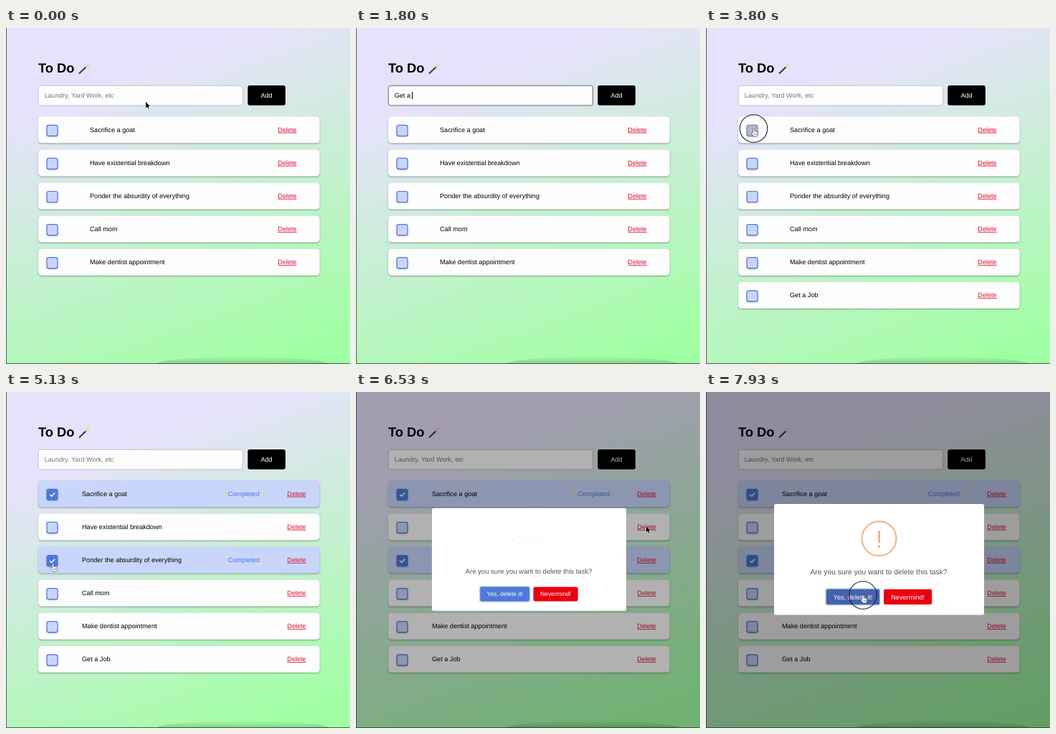
An HTML page with a canvas that plays this animation: 480 by 468 pixels, repeating every 8000 ms.

```html
<!DOCTYPE html>
<html lang="en">
<head>
<meta charset="utf-8">
<title>To Do</title>
<style>
  html, body { margin: 0; width: 100%; height: 100%; overflow: hidden; }
  canvas { display: block; }
</style>
</head>
<body>
<canvas id="stage" width="480" height="468"></canvas>
<script>
const ctx = document.getElementById('stage').getContext('2d');
const LOOP = 8000, STEP = 1000 / 15;
const FONT = '"Liberation Sans", Arial, sans-serif';
const BLUE = '#4f78d8', PALE_BLUE = '#c8d6fb', RED = '#dc1035';
const TASKS = ['Sacrifice a goat', 'Have existential breakdown',
  'Ponder the absurdity of everything', 'Call mom', 'Make dentist appointment', 'Get a Job'];
const NEW_TASK = TASKS[5];

const TIME = { focus: 600, type: 866, key: 166, add: 3120, check1: 3860, check3: 5120, modal: 6479 };
const CLICKS = [[530, 660], [3000, 3110], [3730, 3860], [5000, 5110], [6400, 6500], [7860, 8000]];
// Pointer stops: time, x, y
const PATH = [[0, 195, 103], [60, 195, 103], [470, 150, 95], [2390, 150, 95], [2900, 362, 95],
  [3260, 362, 95], [3720, 66.5, 140], [4130, 66.5, 140], [4670, 65.5, 239], [5470, 65.5, 239],
  [6270, 405, 187], [6660, 405, 187], [7540, 219, 283], [8000, 219, 283]];

const clamp = v => Math.max(0, Math.min(1, v));
const smooth = v => v * v * (3 - 2 * v);
const easeOut = v => 1 - (1 - v) ** 2;

function keyed(stops, t, ease) {
  const i = Math.max(1, stops.findIndex(s => s[0] >= t));
  const a = stops[i - 1], b = stops[i];
  const k = ease(clamp((t - a[0]) / (b[0] - a[0])));
  return a.slice(1).map((v, n) => v + (b[n + 1] - v) * k);
}

function text(str, x, y, { size = 9.15, color = '#000', align = 'left', weight = '' } = {}) {
  ctx.font = `${weight} ${size}px ${FONT}`;
  ctx.fillStyle = color;
  ctx.textAlign = align;
  ctx.fillText(str, x, y);
}

function box(x, y, w, h, r, fill, stroke, line = 1) {
  ctx.beginPath();
  ctx.roundRect(x, y, w, h, r);
  ctx.fillStyle = fill;
  ctx.fill();
  if (stroke) {
    ctx.shadowColor = 'transparent';
    ctx.strokeStyle = stroke;
    ctx.lineWidth = line;
    ctx.stroke();
  }
}

function shadowed(alpha, draw) {
  ctx.save();
  ctx.shadowColor = `rgba(0,0,0,${alpha})`;
  ctx.shadowBlur = 2;
  ctx.shadowOffsetY = 1;
  draw();
  ctx.restore();
}

function line(points, color, width) {
  ctx.beginPath();
  points.forEach(p => ctx.lineTo(...p));
  ctx.strokeStyle = color;
  ctx.lineWidth = width;
  ctx.stroke();
}

function sparkle(x, y, r, color = '#f5d273') {
  ctx.beginPath();
  for (let i = 0; i < 8; i++) {
    const d = i % 2 ? r * 0.3 : r, a = i * Math.PI / 4;
    ctx.lineTo(x + d * Math.cos(a), y + d * Math.sin(a));
  }
  ctx.fillStyle = color;
  ctx.fill();
}

function sparkles(x, y) {
  sparkle(x + 0.7, y, 3.2);
  sparkle(x - 2.6, y - 2.5, 1.5);
  sparkle(x - 2.4, y + 2.6, 1.6);
}

function background() {
  const dx = Math.sin(160 * Math.PI / 180), dy = -Math.cos(160 * Math.PI / 180);
  const half = (480 * dx + 468 * dy) / 2;
  const g = ctx.createLinearGradient(240 - dx * half, 234 - dy * half, 240 + dx * half, 234 + dy * half);
  g.addColorStop(0.2, '#e7e2fc');
  g.addColorStop(0.93, '#a1ffa3');
  ctx.fillStyle = g;
  ctx.fillRect(0, 0, 480, 468);

  const shade = ctx.createLinearGradient(0, 457, 0, 468);
  shade.addColorStop(0, 'rgba(60,110,60,0)');
  shade.addColorStop(1, 'rgba(60,110,60,.3)');
  ctx.fillStyle = shade;
  ctx.beginPath();
  ctx.ellipse(330, 468, 120, 10, 0, 0, 7);
  ctx.fill();
}

function header(t) {
  text('To Do', 45, 61.8, { size: 18.3, weight: 'bold' });
  line([[102, 63.5], [113, 53]], '#37343a', 2);
  line([[111.3, 54.6], [113.5, 52.5]], '#e8e4df', 2);
  sparkle(114.5, 51.5, 3.2);
  sparkle(109, 50.5, 1.6);
  sparkle(116.5, 56.5, 1.6);

  const focused = t >= TIME.focus && t < 3000;
  box(45.2, 80.3, 285.3, 27.6, 3, '#fdfdfd', focused ? '#666' : '#c3c3c8');
  const count = t >= TIME.add ? 0 : Math.max(0, Math.floor((t - TIME.type) / TIME.key) + 1);
  const typed = NEW_TASK.slice(0, count);
  if (typed) text(typed, 53.7, 97);
  else text('Laundry, Yard Work, etc', 53.7, 97, { color: '#75757a' });
  if (focused) {
    ctx.fillStyle = '#000';
    ctx.fillRect(Math.round(53.7 + (typed ? ctx.measureText(typed).width : 0) - 0.5), 89, 1, 10);
  }
  box(337.3, 80, 52.6, 27.8, 3, '#000');
  text('Add', 363.5, 97, { color: '#fff', align: 'center' });
}

function task(name, i, t) {
  const y = 123.3 + i * 46.1, base = y + 21.4;
  const done = (i === 0 && t >= TIME.check1) || (i === 2 && t >= TIME.check3);
  const shifted = t >= TIME.check1;
  const pressed = (i === 0 && t >= 3730 && !done) || (i === 2 && t >= 5000 && !done);

  shadowed(0.35, () => box(45, y, 392.7, 37, 4.6, done ? PALE_BLUE : '#fdfdfd'));
  shadowed(0.45, () => box(57, y + 12, 15, 15, 2.6,
    done ? BLUE : pressed ? '#b2b9c8' : PALE_BLUE, pressed ? '#6f87b8' : BLUE, 1.2));
  if (done) {
    line([[61.2, y + 19.6], [63.6, y + 22], [68.2, y + 17.2]], '#fff', 1.5);
    text('Completed', 331.7, base, { color: BLUE, align: 'center' });
    sparkles(304.8, y + 18.5);
    sparkles(358.6, y + 18.5);
  }
  text(name, shifted ? 106 : 117, base);
  const x = shifted ? 392.3 : 379.3;
  text('Delete', x, base, { color: RED });
  ctx.fillRect(x, base + 1, 26.4, 0.8);
}

function icon(age) {
  const k = easeOut(clamp(age / 500));
  const tilt = Math.cos((1 - k) * 100 * Math.PI / 180);
  if (tilt <= 0) return;
  ctx.save();
  ctx.translate(241.5, 204.2);
  ctx.scale(1, tilt);
  ctx.globalAlpha = k;
  ctx.beginPath();
  ctx.arc(0, 0, 24, 0, 7);
  ctx.strokeStyle = '#f4b78d';
  ctx.lineWidth = 2.2;
  ctx.stroke();
  const [angle, alpha] = keyed([[0, 45, 0], [125, -25, 0.4], [250, 15, 0.8], [375, -5, 1], [500, 0, 1]],
    Math.min(age, 500), smooth);
  ctx.rotate(angle * Math.PI / 180);
  ctx.globalAlpha = k * alpha;
  text('!', 0, 12.3, { size: 34.3, color: '#f3b083', align: 'center' });
  ctx.restore();
}

function modal(t, pointer) {
  const age = t - TIME.modal;
  if (age < 0) return;
  ctx.fillStyle = `rgba(0,0,0,${0.38 * easeOut(clamp(age / 100))})`;
  ctx.fillRect(0, 0, 480, 468);

  const [scale] = keyed([[0, 0.7], [135, 1.05], [240, 0.95], [300, 1]], Math.min(age, 300), easeOut);
  ctx.save();
  ctx.translate(241.5, 233.3);
  ctx.scale(scale, scale);
  ctx.translate(-241.5, -233.3);
  box(95, 156, 293, 154.6, 2.9, '#fff');
  icon(age);
  text('Are you sure you want to delete this task?', 241, 254.2,
    { size: 10.3, color: '#545454', align: 'center' });
  const hover = overConfirm(pointer);
  box(166.4, 273.3, 77, 24.2, 3.5, '#b1cae4');
  box(167.8, 274.7, 74.2, 21.4, 2.3, hover ? (clicking(t) ? '#4561ae' : '#476cc2') : BLUE);
  box(248, 274.7, 67.2, 21.4, 2.3, '#e90010');
  text('Yes, delete it!', 205, 288.6, { color: '#fff', align: 'center' });
  text('Nevermind!', 281.6, 288.6, { color: '#fff', align: 'center' });
  ctx.restore();
}

const clicking = t => CLICKS.some(([from, to]) => t >= from && t < to);
const inside = ([px, py], x, y, w, h) => px >= x && px <= x + w && py >= y && py <= y + h;
const overConfirm = p => inside(p, 168, 275, 74, 21);

function cursorKind(t, p) {
  if (t >= TIME.modal) return overConfirm(p) || inside(p, 248, 275, 67, 21) ? 'hand' : 'arrow';
  if (inside(p, 337, 80, 53, 28)) return 'hand';
  if (t > 100 && inside(p, 45, 80, 286, 28)) return 'beam';
  const rowY = (p[1] - 123.3) % 46.1;
  const overBox = p[0] > 55 && p[0] < 74 && rowY > 10 && rowY < 29;
  const overDelete = p[0] > 392 && p[0] < 419 && rowY > 12 && rowY < 26;
  return overBox || overDelete ? 'hand' : 'arrow';
}

const SHAPES = {
  arrow: new Path2D('M0 0V8.2L1.9 6.5 3.1 9.3 4.6 8.7 3.4 5.9H5.9Z'),
  hand: new Path2D('M-.9.8Q0-.5.9.8V4.1Q2 3.3 2.6 4.4 3.6 3.8 4.2 4.9 5.4 4.6 5.5 5.8V7.6Q5.4 9.2 4.6 10.8H.2Q-.9 9.2-2.8 6.7-2.9 5.3-.9 6.6Z'),
  beam: new Path2D('M-1.8-4.5Q0-4.5 0-3V3Q0 4.5-1.8 4.5M1.8-4.5Q0-4.5 0-3M0 3Q0 4.5 1.8 4.5')
};

function cursor(t, p) {
  if (t >= TIME.type && t < 2390) return;
  const kind = cursorKind(t, p);
  ctx.save();
  ctx.translate(...p);
  if (clicking(t)) {
    ctx.beginPath();
    ctx.arc(0, 0, 19.3, 0, 7);
    ctx.strokeStyle = '#222';
    ctx.lineWidth = 1.1;
    ctx.stroke();
  }
  ctx.lineJoin = 'round';
  ctx.lineWidth = kind === 'hand' ? 0.9 : 1;
  ctx.strokeStyle = kind === 'arrow' ? '#fff' : '#111';
  ctx.fillStyle = kind === 'arrow' ? '#000' : '#fff';
  ctx.stroke(SHAPES[kind]);
  if (kind !== 'beam') ctx.fill(SHAPES[kind]);
  if (kind === 'hand') {
    for (const x of [1, 2.4, 3.8]) line([[x, 6.6], [x, 9]], '#333', 0.5);
  }
  ctx.restore();
}

function windowEdge() {
  ctx.fillStyle = 'rgba(40,45,50,.75)';
  ctx.fillRect(0, 0, 1, 468);
  ctx.fillRect(0, 467, 480, 1);
}

function render(now) {
  const t = Math.floor((now % LOOP) / STEP + 0.06) * STEP % LOOP;
  const pointer = keyed(PATH, t, smooth);
  ctx.textRendering = 'geometricPrecision';
  background();
  header(t);
  TASKS.slice(0, t >= TIME.add ? 6 : 5).forEach((name, i) => task(name, i, t));
  modal(t, pointer);
  windowEdge();
  cursor(t, pointer);
  requestAnimationFrame(() => render(performance.now()));
}
render(performance.now());
</script>
</body>
</html>
```
